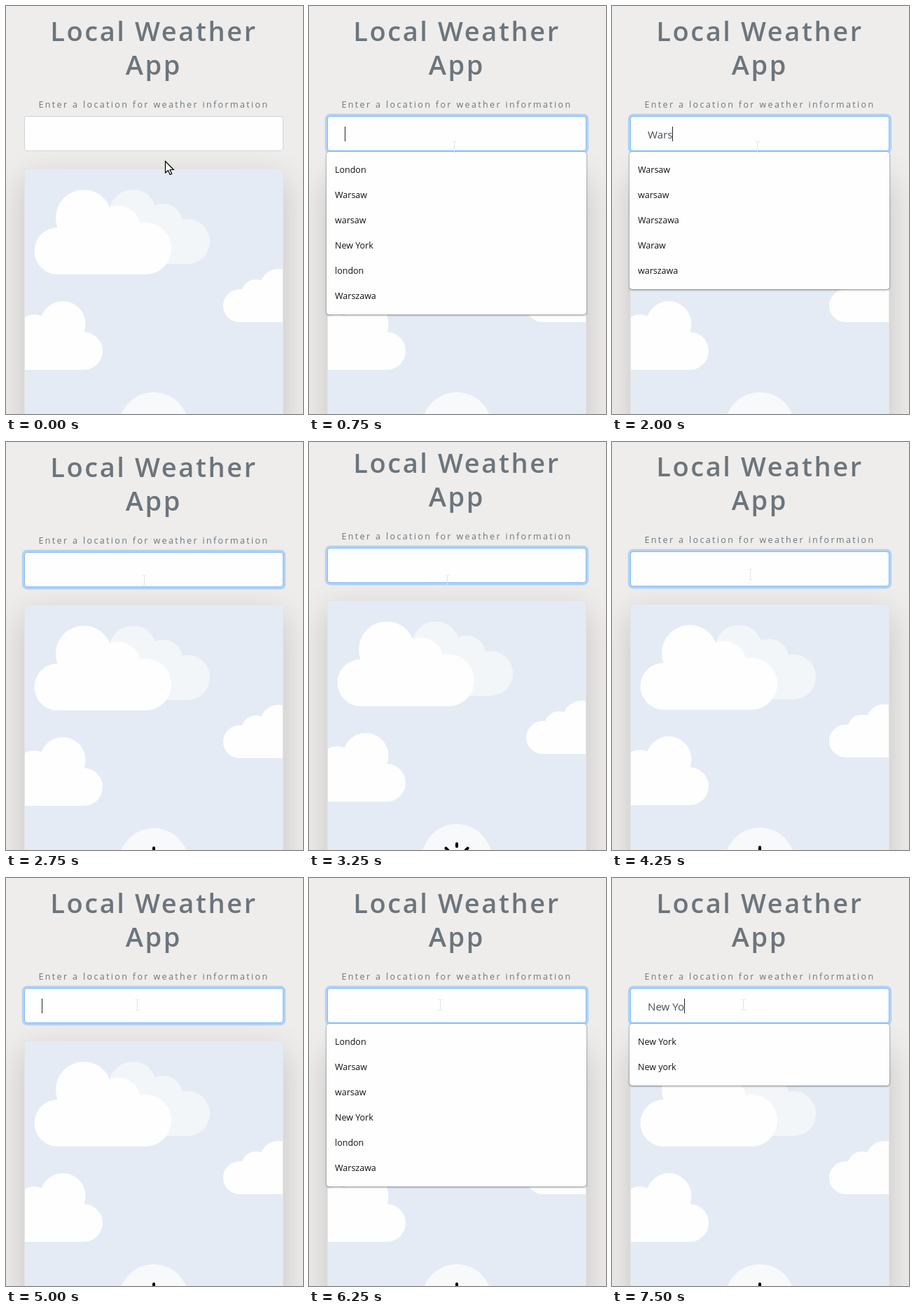
An HTML page for the animation above (8 s loop, 424 px wide and 582 px high).

```html
<!DOCTYPE html>
<html lang="en">
<head>
<meta charset="utf-8">
<title>Local Weather App</title>
<style>
  html, body { margin: 0; width: 100%; height: 100%; overflow: hidden; background: #eeedeb; }
  body { position: relative; font-family: "Open Sans", "Noto Sans", sans-serif; }
  #page { position: absolute; left: 0; top: 0; width: 424px; height: 940px; }
  #page > * { position: absolute; box-sizing: border-box; }
  .card {
    left: 26px; top: 232px; width: 370px; height: 664px;
    background: #fefefe; border: 1px solid rgba(0, 0, 0, .1); border-radius: 4px;
    box-shadow: 0 16px 48px rgba(0, 0, 0, .175);
  }
  svg { display: block; overflow: hidden; }
  #art { left: 0; top: 0; }
  #art text { fill: #6c757d; text-anchor: middle; }
  .title { font-size: 38px; font-weight: 600; letter-spacing: 2.6px; }
  .hint { font-size: 12.5px; letter-spacing: 2.36px; }
  .city { font-size: 19.2px; font-weight: 600; letter-spacing: 2.9px; }
  .sky { font-size: 12.3px; letter-spacing: 3.2px; }
  .degrees { font-size: 56px; font-weight: 300; }
  #field {
    left: 26px; top: 157px; width: 370px; height: 50px;
    background: #fefefe; border: 1px solid #ced4da; border-radius: 4px;
  }
  #field.focus { border-color: #80bdff; box-shadow: 0 0 0 3.2px rgba(0, 123, 255, .25); }
  #typed {
    position: absolute; left: 24px; top: 0; height: 50px;
    font-size: 15.1px; line-height: 50px; white-space: pre; color: #495057;
  }
  #typed.caret::after {
    content: ""; position: absolute; left: 100%; top: 14px;
    width: 1px; height: 21px; background: #222;
  }
  #list {
    left: 25px; top: 208px; width: 371px; padding: 8px 12px;
    background: #fefefe; border-radius: 4px; color: #111;
    font-size: 12.5px; line-height: 36px;
    box-shadow: 0 0 1px rgba(0, 0, 0, .5), 0 1px 3px rgba(0, 0, 0, .45);
  }
  #cursor { position: absolute; left: 0; top: 0; }
</style>
</head>
<body>
<div id="page">
  <div class="card"></div>
  <svg id="art" width="424" height="940">
    <text class="title" x="211" y="50">Local Weather</text>
    <text class="title" x="211" y="98">App</text>
    <text class="hint" x="211" y="145">Enter a location for weather information</text>

    <svg x="27" y="233" width="368" height="368" viewBox="27 233 368 368">
      <rect x="27" y="233" width="368" height="368" fill="#e5ebf5"/>
      <g fill="#f3f6f9">
        <circle cx="181" cy="296" r="34"/>
        <circle cx="225" cy="309" r="27"/>
        <circle cx="259" cy="336" r="32"/>
        <rect x="150" y="305" width="109" height="63"/>
      </g>
      <g fill="#fefefe">
        <circle cx="111" cy="302" r="40"/>
        <circle cx="160" cy="317" r="32"/>
        <circle cx="199" cy="346" r="37"/>
        <circle cx="74" cy="349.5" r="33.5"/>
        <rect x="74" y="316" width="125" height="67"/>

        <circle cx="333.5" cy="427.5" r="23.5"/>
        <circle cx="357" cy="411" r="21"/>
        <circle cx="389" cy="402" r="27"/>
        <rect x="333.5" y="404" width="70" height="47"/>

        <circle cx="40" cy="465" r="25"/>
        <circle cx="81" cy="453.5" r="32.5"/>
        <circle cx="111" cy="492" r="27"/>
        <rect x="20" y="465" width="91" height="54"/>
      </g>
    </svg>

    <circle cx="211" cy="601" r="50" fill="#f8f9fa"/>
    <g id="sun" transform="translate(211 601)" fill="none" stroke="#000" stroke-width="4" stroke-linecap="round">
      <circle r="10"/>
    </g>
    <text class="city" x="211.5" y="742">WARSAW</text>
    <text class="sky" x="211.5" y="777">SUNNY</text>
    <text class="degrees" x="209" y="862">17.8 °C</text>
  </svg>
  <div id="field"><span id="typed"></span></div>
  <div id="list"></div>
</div>
<svg id="cursor" width="424" height="582">
  <path id="arrow" d="M0 0V16.5L4 13L6.6 19L9.2 18L6.6 12H11.8Z" fill="#fff" stroke="#000" stroke-width="1.2"/>
  <path id="beam" d="M-3 -7.5H-.5M.5 -7.5H3M0 -7V7M-3 7.5H-.5M.5 7.5H3" fill="none" stroke="#dfe3e6"/>
</svg>

<script>
  const LOOP = 8000;
  const $ = id => document.getElementById(id);

  const recent = ["London", "Warsaw", "warsaw", "New York", "london", "Warszawa"];
  const startingWar = ["Warsaw", "warsaw", "Warszawa", "Waraw", "warszawa"];
  const startingNew = ["New York", "New york"];
  const none = [];

  const start = {
    scroll: 0, focus: false, caret: false, text: "", list: none,
    sun: false, pointer: "arrow", x: 227.5, y: 221.5
  };

  // Each step changes only the listed parts of the state.
  const steps = [
    [250, { pointer: "beam", x: 207.5, y: 201 }],
    [500, { focus: true, caret: true }],
    [750, { list: recent }],
    [1000, { caret: false }],
    [1500, { text: "W", caret: true, list: startingWar }],
    [1750, { text: "Wa" }],
    [2000, { text: "Wars" }],
    [2250, { text: "Warsaw", list: startingWar.slice(0, 2) }],
    [2500, { text: "", caret: false, list: none, x: 197.5, y: 197.5 }],
    [2750, { sun: true }],
    [3250, { scroll: 6 }],
    [3500, { scroll: 358, pointer: "" }],
    [4000, { scroll: 170 }],
    [4250, { scroll: 1, pointer: "beam", y: 189 }],
    [4500, { scroll: 0 }],
    [4750, { caret: true, x: 192.5, y: 185 }],
    [5000, { x: 187.5, y: 181 }],
    [5250, { caret: false }],
    [5750, { caret: true }],
    [6250, { caret: false, list: recent }],
    [6500, { text: "N", caret: true, list: startingNew }],
    [6750, { text: "Ne" }],
    [7000, { text: "New" }],
    [7250, { text: "New Y" }],
    [7500, { text: "New Yo" }]
  ];

  for (let i = 0; i < 8; i++) {
    const ray = document.createElementNS($("sun").namespaceURI, "path");
    ray.setAttribute("d", "M0 -18V-22");
    ray.setAttribute("transform", `rotate(${i * 45})`);
    $("sun").append(ray);
  }

  const show = (id, on) => { $(id).style.display = on ? "" : "none"; };

  function render(s) {
    $("page").style.top = -s.scroll + "px";
    $("field").classList.toggle("focus", s.focus);
    $("typed").classList.toggle("caret", s.caret);
    $("typed").textContent = s.text;
    $("list").replaceChildren(...s.list.map(name => {
      const row = document.createElement("div");
      row.textContent = name;
      return row;
    }));
    show("list", s.list.length);
    show("sun", s.sun);
    for (const id of ["arrow", "beam"]) {
      show(id, s.pointer === id);
      $(id).setAttribute("transform", `translate(${s.x} ${s.y})`);
    }
  }

  let shown = -1;
  function tick() {
    const time = performance.now() % LOOP;
    const past = steps.filter(([at]) => at <= time);
    if (past.length !== shown) {
      shown = past.length;
      render(Object.assign({}, start, ...past.map(([, change]) => change)));
    }
    requestAnimationFrame(tick);
  }
  tick();
</script>
</body>
</html>
```
